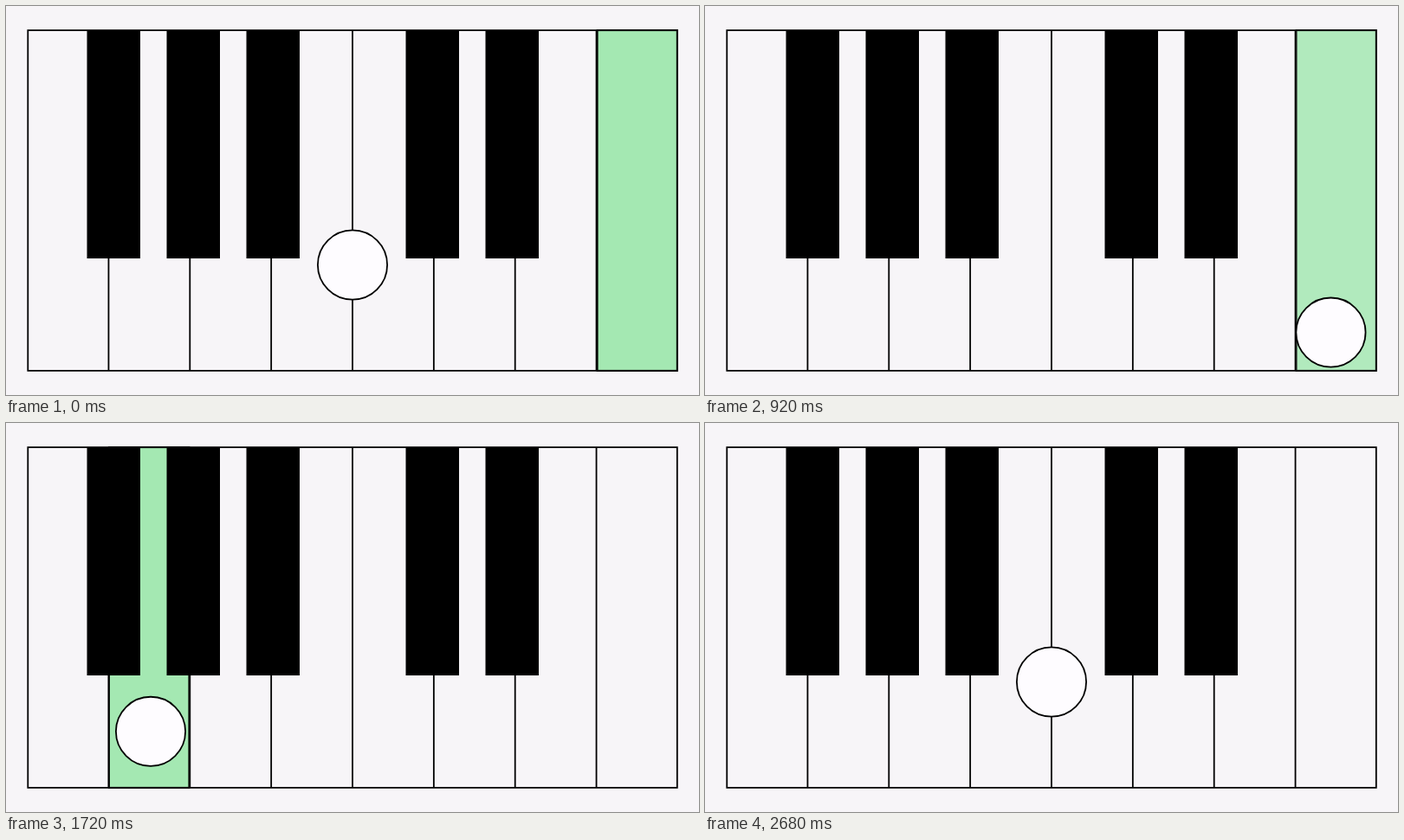
Write an HTML page that moves like this. It is 800 by 450 pixels and loops after 2760 ms.

```html
<!DOCTYPE html>
<html lang="en">
<head>
<meta charset="utf-8">
<title>Piano ball</title>
<style>
  html, body { margin: 0; width: 100%; height: 100%; overflow: hidden; background: #f7f5f8; }
  svg { display: block; width: 100vw; height: 100vh; }
</style>
</head>
<body>
<svg viewBox="0 0 800 450" stroke="#000" stroke-width="1.8">
  <rect width="800" height="450" fill="#f7f5f8" stroke="none"/>
  <rect x="25.3" y="28.1" width="749.5" height="393.8" fill="none"/>
  <path id="seams" fill="none"/>
  <g fill="#a4e8b2" stroke-width="2">
    <rect id="high" x="682.6" y="28.1" width="92.2" height="393.8"/>
    <rect id="low" x="118.9" y="28.1" width="92.5" height="393.8"/>
  </g>
  <path id="blacks" stroke="none"/>
  <circle id="ball" r="40.1" fill="#fefcff"/>
</svg>
<script>
const LOOP = 2760, STEP = 40, FPS = 24;
const $ = id => document.getElementById(id);
const clamp = v => Math.min(1, Math.max(0, v));
const ramp = (f, from, to) => clamp((f - from) / (to - from));

let seams = '', blacks = '';
for (let i = -3; i <= 3; i++) seams += `M${400 + 93.85 * i} 28V422`;
for (let i = 0; i < 6; i++) {
  if (i !== 3) blacks += `M${93.5 + 92 * i} 28h61.5v264h-61.5z`;
}
$('seams').setAttribute('d', seams);
$('blacks').setAttribute('d', blacks);

const cubic = (a, b, c, d, q) => {
  const r = 1 - q;
  return a * r ** 3 + 3 * b * q * r * r + 3 * c * q * q * r + d * q ** 3;
};

// Ease in and out; a and b set how long each end lingers
function ease(u, a, b) {
  let lo = 0, hi = 1;
  for (let i = 0; i < 24; i++) {
    const mid = (lo + hi) / 2;
    if (cubic(0, a, b, 1, mid) < u) lo = mid; else hi = mid;
  }
  return cubic(0, 0, 1, 1, lo);
}

// The ball swings from the middle to the high key, the low key and back
const middle = [400, 299.5], right = [730.2, 367], left = [167, 356.7];
const swings = [
  { from: 0, to: 15, pull: [0.67, 0.42], path: [middle, [500, 299.3], [730.2, 319], right] },
  { from: 15, to: 42, pull: [0.67, 0.42], path: [right, [730.2, 423.7], [167, 397.5], left] },
  { from: 42, to: 64, pull: [0.37, 0.59], path: [left, [167, 321], [279, 299.5], middle] }
];

function ballAt(f) {
  const s = swings.find(s => f < s.to) || swings[2];
  const q = ease(ramp(f, s.from, s.to), ...s.pull);
  return [0, 1].map(n => cubic(...s.path.map(p => p[n]), q));
}

function draw(ms) {
  // 24 fps motion shown on a 40 ms grid
  const tick = Math.floor((ms % LOOP) / STEP + 1e-4);
  const f = Math.round(tick * STEP * FPS / 1000);
  const [x, y] = ballAt(f);
  $('ball').setAttribute('cx', x.toFixed(2));
  $('ball').setAttribute('cy', y.toFixed(2));
  $('high').setAttribute('opacity', 1 - ramp(f, 21, 27));
  $('low').setAttribute('opacity', ramp(f, 25.9, 31.8) - ramp(f, 55.8, 62));
}

let start = null;
function loop(now) {
  if (start === null) start = now;
  draw(now - start);
  requestAnimationFrame(loop);
}
draw(0);
requestAnimationFrame(loop);
</script>
</body>
</html>
```
